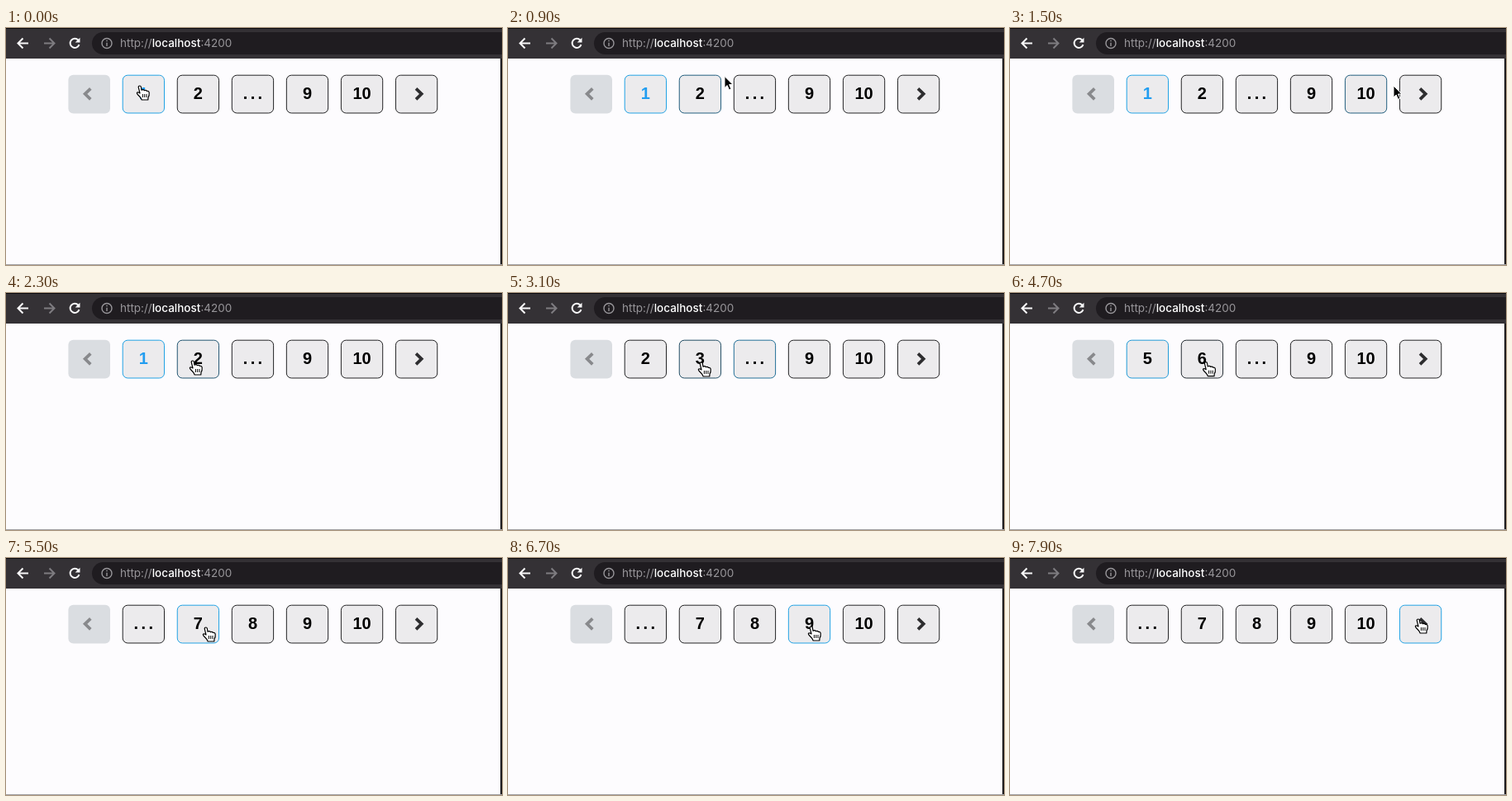
Write an HTML page that moves like this. It is 600 by 287 pixels and loops after 8000 ms.

```html
<!DOCTYPE html>
<html lang="en">
<head>
<meta charset="utf-8">
<title>Pagination</title>
<style>
  html, body { margin: 0; width: 100%; height: 100%; overflow: hidden; background: #fdfcfe; }
  svg { display: block; width: 600px; height: 287px; }
  .url { font: 13.5px Inter, sans-serif; fill: #98969a; }
  .host { font-weight: 500; fill: #fff; }
  .label { font: bold 20px "Liberation Sans", Arial, sans-serif; text-anchor: middle; }
  .line { fill: none; stroke-width: 2; }
  .chevron { fill: none; stroke-width: 3.7; }
</style>
</head>
<body>
<svg viewBox="0 0 600 287">
  <rect width="600" height="287" fill="#fdfcfe"/>
  <rect width="600" height="37" fill="#343135"/>
  <rect width="600" height="1" fill="#0c0b0d"/>
  <rect x="104" y="5" width="520" height="27" rx="13.5" fill="#1f1c20"/>
  <g class="line" stroke="#f8f8f9">
    <path d="M27 18.5H15M20.5 12.5L14.5 18.5L20.5 24.5"/>
    <path d="M87.4 14.6A5.6 5.6 0 1 0 88.5 20.2"/>
    <path d="M89.5 11.8V17.6H83.7Z" fill="#f8f8f9" stroke="none"/>
  </g>
  <path class="line" stroke="#7e7c80" d="M46 18.5H58M52.5 12.5L58.5 18.5L52.5 24.5"/>
  <g fill="none" stroke="#98969a" stroke-width="1.4">
    <circle cx="122" cy="18.5" r="6"/>
    <path d="M122 17.7V22M122 14.8V16.3"/>
  </g>
  <text class="url" x="138" y="23.3">http://<tspan class="host">localhost</tspan>:4200</text>
  <rect x="598" y="37" width="2" height="250" fill="#1d1b1e"/>
  <rect y="286" width="600" height="1" fill="#a3a2a5"/>
  <rect x="75.4" y="56.8" width="50.6" height="46.6" rx="6" fill="#dadde1"/>
  <path class="chevron" stroke="#88898c" d="M102.3 73.3L95.6 79.8L102.3 86.3"/>
  <g id="buttons"></g>
  <path class="chevron" stroke="#2d2d2f" d="M496 73.3L502.7 79.8L496 86.3"/>
  <path id="arrow" fill="#000" stroke="#fff" stroke-linejoin="round" d="M0 0V14L3.2 11L5.5 16.4L7.9 15.3L5.6 10H10Z"/>
  <g id="hand" stroke="#000" stroke-width="1.2" stroke-linejoin="round">
    <path fill="#fff" d="M-1.8 1.7Q-1.8 0-.2 0Q1.2 0 1.4 1.7L2 5.2Q4.5 4 5.4 5.7Q7.6 4.9 8.4 6.5Q11 6 11.2 8.5Q11.5 12 10 14.2L9.8 17H2.2Q1.4 14.6-.8 12.5Q-4 9.5-3.6 8.4Q-2.6 7 0 9Z"/>
    <path fill="none" stroke-width="1" d="M3.4 10V14M5.7 10V14M8 10V14"/>
  </g>
</svg>
<script>
const LOOP = 8000, TICK = 100, STEP = 10, FADE = 150, LAST_PAGE = 7;
const DARK = [36, 36, 38], BLUE = [34, 162, 228];
const LEFT = 141.2, PITCH = 66.05, WIDTH = 50.3, TOP = 57.2, HEIGHT = 45.8;

// Each move eases the pointer to a spot, where it rests: start, end, x, y
const origin = [162, 70];
const moves = [
  [0, 300, 100, 95],
  [550, 1250, 424, 22],
  [1250, 1400, 430, 66],
  [1400, 1500, 464, 70],
  [1500, 1700, 505, 130],
  [1700, 2100, 124, 125],
  [2100, 2300, 226, 82],
  [2600, 3000, 298, 86],
  [3000, 3100, 234, 84],
  [3300, 3650, 345, 102],
  [3650, 3900, 266, 103],
  [3900, 4000, 226, 83],
  [4000, 5100, 242, 84],
  [5800, 6600, 367, 83],
  [6800, 7100, 395, 162],
  [7100, 7500, 440, 88],
  [7500, 7800, 494, 74]
];
// Two separate clicks, then a steady series
const clicks = [2500, 3300, ...Array.from({ length: 4 }, (_, i) => 4300 + 400 * i)];

const clamp = v => Math.max(0, Math.min(1, v));
const smooth = k => k * k * (3 - 2 * k);
const pageAt = t => 1 + clicks.filter(time => time <= t).length;
const labelsFor = page => page < LAST_PAGE ? [page, page + 1, "...", 9, 10, ""] : ["...", 7, 8, 9, 10, ""];

function pointerAt(t) {
  return moves.reduce(([px, py], [from, to, x, y]) => {
    const k = smooth(clamp((t - from) / (to - from)));
    return [px + (x - px) * k, py + (y - py) * k];
  }, origin);
}

function hoveredAt([x, y]) {
  if (y < TOP || y > TOP + HEIGHT) return -1;
  const i = Math.floor((x - LEFT) / PITCH);
  return i >= 0 && i < 6 && x - LEFT - i * PITCH <= WIDTH ? i : -1;
}

// Border fades, replayed from the start of the loop
function buildStates() {
  const states = [];
  let glow = [1, 0, 0, 0, 0, 0];
  for (let t = 0; t < LOOP; t += STEP) {
    const page = pageAt(t), pointer = pointerAt(t), hovered = hoveredAt(pointer);
    // A clicked button slides to the first place and a new one takes its own
    if (clicks.includes(t) && page < LAST_PAGE) glow = [glow[1], 0, ...glow.slice(2)];
    glow = glow.map((g, i) => {
      const lit = i === hovered || (i === 0 && page === 1);
      return clamp(g + (lit ? STEP : -STEP) / FADE);
    });
    if (t % TICK === 0) states.push({ page, pointer, hovered, glow });
  }
  return states;
}

function make(parent, tag, attrs) {
  const node = document.createElementNS("http://www.w3.org/2000/svg", tag);
  for (const name in attrs) node.setAttribute(name, attrs[name]);
  return parent.appendChild(node);
}

const group = document.getElementById("buttons");
const buttons = Array.from({ length: 6 }, (_, i) => {
  const x = LEFT + i * PITCH;
  return {
    box: make(group, "rect", { x, y: TOP, width: WIDTH, height: HEIGHT, rx: 6, fill: "#ecebed" }),
    text: make(group, "text", { class: "label", x: x + WIDTH / 2, y: 86.2 })
  };
});
const arrow = document.getElementById("arrow"), hand = document.getElementById("hand");
const states = buildStates();
const mix = k => `rgb(${DARK.map((c, i) => Math.round(c + (BLUE[i] - c) * k))})`;

function draw(t) {
  const { page, pointer, hovered, glow } = states[Math.floor(t / TICK)];
  const labels = labelsFor(page);
  buttons.forEach(({ box, text }, i) => {
    const spacing = labels[i] === "..." ? 3.4 : 0;
    box.setAttribute("stroke", mix(glow[i]));
    text.textContent = labels[i];
    text.setAttribute("letter-spacing", spacing);
    text.setAttribute("dx", spacing / 2);
    text.setAttribute("fill", page === 1 && i === 0 ? "#229df0" : "#000");
  });
  const place = `translate(${pointer.map(v => v.toFixed(1))})`;
  for (const cursor of [arrow, hand]) {
    cursor.setAttribute("transform", place);
    cursor.setAttribute("visibility", (cursor === hand) === (hovered >= 0) ? "visible" : "hidden");
  }
}

const start = performance.now();
function frame() {
  draw((performance.now() - start) % LOOP);
  requestAnimationFrame(frame);
}
frame();
</script>
</body>
</html>
```
